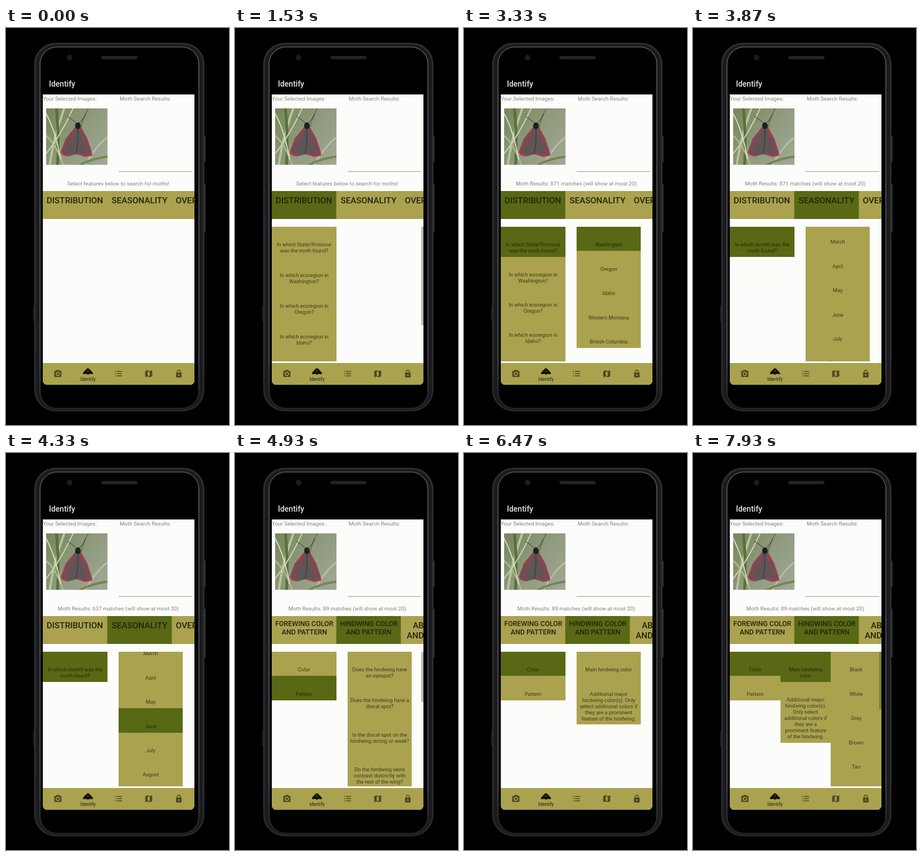
An HTML page with a canvas that plays this animation: 400x711 px, repeating every 8000 ms.

```html
<!DOCTYPE html>
<html lang="en">
<head>
<meta charset="utf-8">
<title>Moth identification</title>
<style>
  html, body { margin: 0; width: 100%; height: 100%; overflow: hidden; background: #000; }
  canvas { display: block; width: 400px; height: 711px; }
</style>
</head>
<body>
<canvas id="stage"></canvas>
<script>
const W = 400, H = 711, LOOP = 8000;
const GOLD = '#aaa24f', DARK = '#586814', PAPER = '#fcfcfb', INK = '#3f3c1a', ICON = '#4e4b20';
const LABEL = '#85857c', BAR = '#b9b9b4';
const FONT = 'Roboto, Arial, sans-serif';
const TOP = 356, BOTTOM = 597, PAD = 32, LINE = 11, ROW = 43.4;

const canvas = document.getElementById('stage');
const ratio = window.devicePixelRatio || 1;
canvas.width = W * ratio;
canvas.height = H * ratio;
const ctx = canvas.getContext('2d');

const PLACES = ['In which State/Province|was the moth found?', 'In which ecoregion in|Washington?',
  'In which ecoregion in|Oregon?', 'In which ecoregion in|Idaho?', 'In which ecoregion in|Montana?'];
const STATES = ['Washington', 'Oregon', 'Idaho', 'Western Montana', 'British Columbia'];
const MONTH = ['In which month was the|moth found?'];
const MONTHS = ['January', 'February', 'March', 'April', 'May', 'June', 'July',
  'August', 'September', 'October', 'November', 'December'];
const ASPECTS = ['Color', 'Pattern'];
const PATTERNS = ['Does the hindwing have|an eyespot?', 'Does the hindwing have a|discal spot?',
  'Is the discal spot on the|hindwing strong or weak?',
  'Do the hindwing veins|contrast distinctly with|the rest of the wing?'];
const MAIN = ['Main hindwing color', 'Additional major|hindwing color(s). Only|select additional colors if|they are a prominent|feature of the hindwing.'];
const MAIN_NARROW = ['Main hindwing|color', 'Additional major|hindwing color(s).|Only select|additional colors if|they are a|prominent feature|of the hindwing.'];
const COLORS = ['Black', 'White', 'Gray', 'Brown', 'Tan', 'Yellow'];

const PROMPT = 'Select features below to search for moths!';
const found = n => `Moth Results: ${n} matches (will show at most 20)`;

const clamp = v => Math.max(0, Math.min(1, v));
const ease = v => { v = clamp(v); return v * v * (3 - 2 * v); };

// Each column: items, picked row, optional gap between rows and scroll function.
const col = (items, picked = -1, extra = {}) => ({ items, picked, ...extra });
const monthScroll = t => 115.7 * ease((t - 3680) / 270);

const SCENES = [
  { at: 0, note: PROMPT, tab: -1, cols: [] },
  { at: 1300, note: PROMPT, tab: 0, cols: [col(PLACES, -1, { gap: 1 })], bar: 176 },
  { at: 2250, note: PROMPT, tab: 0, cols: [col(PLACES, 0), col(STATES)] },
  { at: 2950, note: found(871), tab: 0, cols: [col(PLACES, 0), col(STATES, 0)] },
  { at: 3400, note: found(871), tab: 1, cols: [col(MONTH)] },
  { at: 3570, note: found(871), tab: 1, cols: [col(MONTH, 0), col(MONTHS, -1, { scroll: monthScroll })] },
  { at: 4070, note: found(637), tab: 1, cols: [col(MONTH, 0), col(MONTHS, 5, { scroll: monthScroll })] },
  { at: 4430, note: found(89), tab: 1, wings: true, cols: [col(ASPECTS)] },
  { at: 4730, note: found(89), tab: 1, wings: true, cols: [col(ASPECTS, 1), col(PATTERNS, -1, { gap: 1, shift: 7 })], bar: 90 },
  { at: 6000, note: found(89), tab: 1, wings: true, cols: [col(ASPECTS, 0), col(MAIN)] },
  { at: 7650, note: found(89), tab: 1, wings: true, cols: [col(ASPECTS, 0), col(MAIN_NARROW, 0), col(COLORS)], bar: 103 }
];

function rect(x, y, w, h, fill) {
  ctx.fillStyle = fill;
  ctx.fillRect(x, y, w, h);
}

function rounded(x, y, w, h, r, fill) {
  ctx.beginPath();
  ctx.roundRect(x, y, w, h, r);
  if (fill) {
    ctx.fillStyle = fill;
    ctx.fill();
  }
}

function oval(x, y, rx, ry, fill) {
  ctx.beginPath();
  ctx.ellipse(x, y, rx, ry, 0, 0, 7);
  ctx.fillStyle = fill;
  ctx.fill();
}

function text(str, x, y, size, fill, align = 'left', weight = 400) {
  ctx.font = `${weight} ${size}px ${FONT}`;
  ctx.textAlign = align;
  ctx.fillStyle = fill;
  ctx.fillText(str, x, y);
}

function poly(points, fill) {
  ctx.beginPath();
  points.forEach(([x, y]) => ctx.lineTo(x, y));
  ctx.closePath();
  ctx.fillStyle = fill;
  ctx.fill();
}

function curve(x0, y0, cx, cy, x1, y1, color, width) {
  ctx.beginPath();
  ctx.moveTo(x0, y0);
  ctx.quadraticCurveTo(cx, cy, x1, y1);
  ctx.strokeStyle = color;
  ctx.lineWidth = width;
  ctx.stroke();
}

function outline(x, y, w, h, r, width, top, bottom) {
  const shade = ctx.createLinearGradient(0, y, 0, y + h);
  shade.addColorStop(0, top);
  shade.addColorStop(0.85, top);
  shade.addColorStop(1, bottom);
  rounded(x, y, w, h, r);
  ctx.strokeStyle = shade;
  ctx.lineWidth = width;
  ctx.stroke();
}

function phone() {
  rect(0, 0, W, H, '#000');
  rect(355, 193, 3, 47, '#303033');
  rect(355, 279, 3, 87, '#303033');
  rect(48.5, 497, 2, 28, '#1e1e20');
  rounded(50.5, 26.5, 305.5, 660, 38, '#1b1b1f');
  rounded(60, 33, 287, 648, 30, '#000');
  outline(52, 28, 302.5, 657, 37, 2.5, '#303034', '#28282b');
  outline(61, 34, 285, 647, 30, 1.6, '#5d5d60', '#28282b');
  oval(114, 53, 5, 5, '#1c1c22');
  rounded(171, 50, 65, 6, 3, '#222224');
  text('Identify', 77, 105, 14, '#e4e4df', 'left', 500);
}

function photo() {
  ctx.save();
  ctx.beginPath();
  ctx.rect(72, 144, 110, 101);
  ctx.clip();
  const meadow = ctx.createLinearGradient(72, 150, 182, 235);
  meadow.addColorStop(0, '#76885a');
  meadow.addColorStop(0.5, '#8f9a7d');
  meadow.addColorStop(1, '#a0a794');
  rect(72, 144, 110, 101, meadow);
  curve(78, 250, 84, 200, 106, 140, '#b9c49c', 4);
  curve(92, 250, 96, 200, 90, 140, '#5a7038', 5);
  curve(68, 190, 90, 205, 104, 250, '#aab886', 3);
  curve(72, 225, 100, 190, 122, 140, '#cdd4b8', 2);
  curve(70, 150, 88, 180, 98, 235, '#d8dec6', 2);
  curve(150, 140, 138, 160, 134, 180, '#65784c', 2);
  curve(182, 196, 160, 212, 140, 250, '#b7bfa0', 3);
  curve(126, 250, 146, 235, 184, 230, '#73864f', 4);
  curve(128, 172, 120, 164, 110, 158, '#32342f', 1);
  curve(130, 172, 138, 165, 143, 154, '#32342f', 1);
  poly([[125, 176], [134, 177], [146, 198], [155, 227], [143, 231], [126, 226], [111, 230], [98, 223], [107, 198]], '#5d5655');
  curve(124, 180, 108, 196, 99, 223, '#b33650', 2.2);
  curve(122, 184, 118, 200, 105, 222, '#a63a50', 2);
  curve(134, 179, 147, 200, 154, 227, '#b33650', 2.2);
  curve(133, 184, 140, 202, 148, 226, '#a63a50', 2);
  curve(100, 224, 106, 229, 113, 228, '#b33650', 3);
  curve(130, 224, 140, 231, 154, 227, '#b33650', 3);
  curve(129, 180, 130, 203, 126, 225, '#3f3a3c', 1.5);
  oval(129, 175, 5, 6, '#1f1f22');
  ctx.restore();
}

function tabs(scene) {
  rect(66, 292, 272, 50, GOLD);
  if (scene.tab >= 0) rect(66 + scene.tab * 115.7, 292, 115.7, 50, DARK);
  const put = (s, x, y, size, align) => text(s, x, y, size, '#25230e', align, 500);
  if (scene.wings) {
    ['FOREWING COLOR', 'HINDWING COLOR'].forEach((s, i) => {
      const x = 124.3 + i * 115.7;
      put(s, x, 310, 12.4, 'center');
      put('AND PATTERN', x, 324.5, 12.4, 'center');
    });
    put('ABDOMEN', 319, 314, 15.2, 'left');
    put('AND', 308, 331.5, 15.2, 'left');
  } else {
    put('DISTRIBUTION', 123.5, 313.5, 15.3, 'center');
    put('SEASONALITY', 239.5, 313.5, 15.3, 'center');
    put('OVERALL', 304.5, 313.5, 15.3, 'left');
  }
}

function column(c, x, w, t) {
  let y = TOP - (c.scroll ? c.scroll(t) : 0);
  c.items.forEach((item, i) => {
    const lines = item.split('|');
    const lift = c.shift && i > 1 ? c.shift : 0;
    const h = ROW + (lines.length - 1) * LINE + (c.gap || 0) + lift - (lines.length > 1 ? 0.5 : 0);
    const top = Math.round(y), left = Math.round(x);
    rect(left, top, Math.round(x + w) - left, Math.round(y + h) - top, i === c.picked ? DARK : GOLD);
    lines.forEach((s, k) =>
      text(s, x + w / 2, y + PAD + lift + k * LINE + 3.3, 9.3, i === c.picked ? '#25290a' : INK, 'center'));
    y += h;
  });
}

function lists(scene, t) {
  ctx.save();
  ctx.beginPath();
  ctx.rect(66, TOP, 272, BOTTOM - TOP);
  ctx.clip();
  const three = scene.cols.length === 3;
  const step = three ? 272 / 3 : 135.7;
  const width = three ? step : 115.7;
  scene.cols.forEach((c, i) => column(c, 66 + i * step, width, t));
  if (scene.bar) {
    ctx.globalAlpha = 1 - clamp((t - scene.at - 350) / 200);
    rect(334, TOP, 4, scene.bar, three ? '#807b42' : BAR);
  }
  ctx.restore();
}

function navBar() {
  rect(66, 600, 272, 40, GOLD);
  // camera
  rounded(86.5, 614, 13, 11, 1.5, ICON);
  rect(90, 612.5, 6, 3, ICON);
  oval(93, 619.5, 3.7, 3.7, GOLD);
  oval(93, 619.5, 2.3, 2.3, ICON);
  // moth
  poly([[147, 609], [150, 611], [156, 617.5], [155.5, 620], [149, 619.5], [147, 621.5], [145, 619.5], [138.5, 620], [138, 617.5], [144, 611]], '#131208');
  rect(146.5, 612, 1, 4, '#77723c');
  text('Identify', 147, 632, 8.4, '#25230e', 'center');
  // list
  [615, 619, 623].forEach(y => {
    rect(195.5, y - 0.7, 1.6, 1.5, ICON);
    rect(198.7, y - 0.7, 9.5, 1.5, ICON);
  });
  // map
  poly([[249.7, 614.5], [254, 613], [258, 614.5], [262.3, 613], [262.3, 624], [258, 625.5], [254, 624], [249.7, 625.5]], ICON);
  poly([[254.3, 614.8], [257.7, 616], [257.7, 623.8], [254.3, 622.6]], GOLD);
  // lock
  rounded(305, 617, 10, 9, 1.2, ICON);
  ctx.beginPath();
  ctx.arc(310, 615.5, 2.8, Math.PI, 0);
  ctx.lineTo(312.8, 618);
  ctx.moveTo(307.2, 615.5);
  ctx.lineTo(307.2, 618);
  ctx.strokeStyle = ICON;
  ctx.lineWidth = 1.4;
  ctx.stroke();
  oval(310, 621.5, 1.3, 1.3, GOLD);
}

function draw(t) {
  const scene = SCENES.filter(s => s.at <= t).pop();
  ctx.setTransform(ratio, 0, 0, ratio, 0, 0);
  phone();
  ctx.save();
  rounded(66, 119, 272, 520, [0, 0, 8, 8]);
  ctx.clip();
  rect(66, 119, 272, 521, PAPER);
  text('Your Selected Images:', 66, 130, 9.75, LABEL);
  text('Moth Search Results:', 204, 130, 9.75, LABEL);
  photo();
  rect(202, 256, 132, 2, '#c9c8b4');
  text(scene.note, 201.5, 282.3, 9.75, LABEL, 'center');
  tabs(scene);
  lists(scene, t);
  navBar();
  ctx.restore();
}

const start = performance.now();
function tick() {
  draw((performance.now() - start) % LOOP);
  requestAnimationFrame(tick);
}
tick();
</script>
</body>
</html>
```
